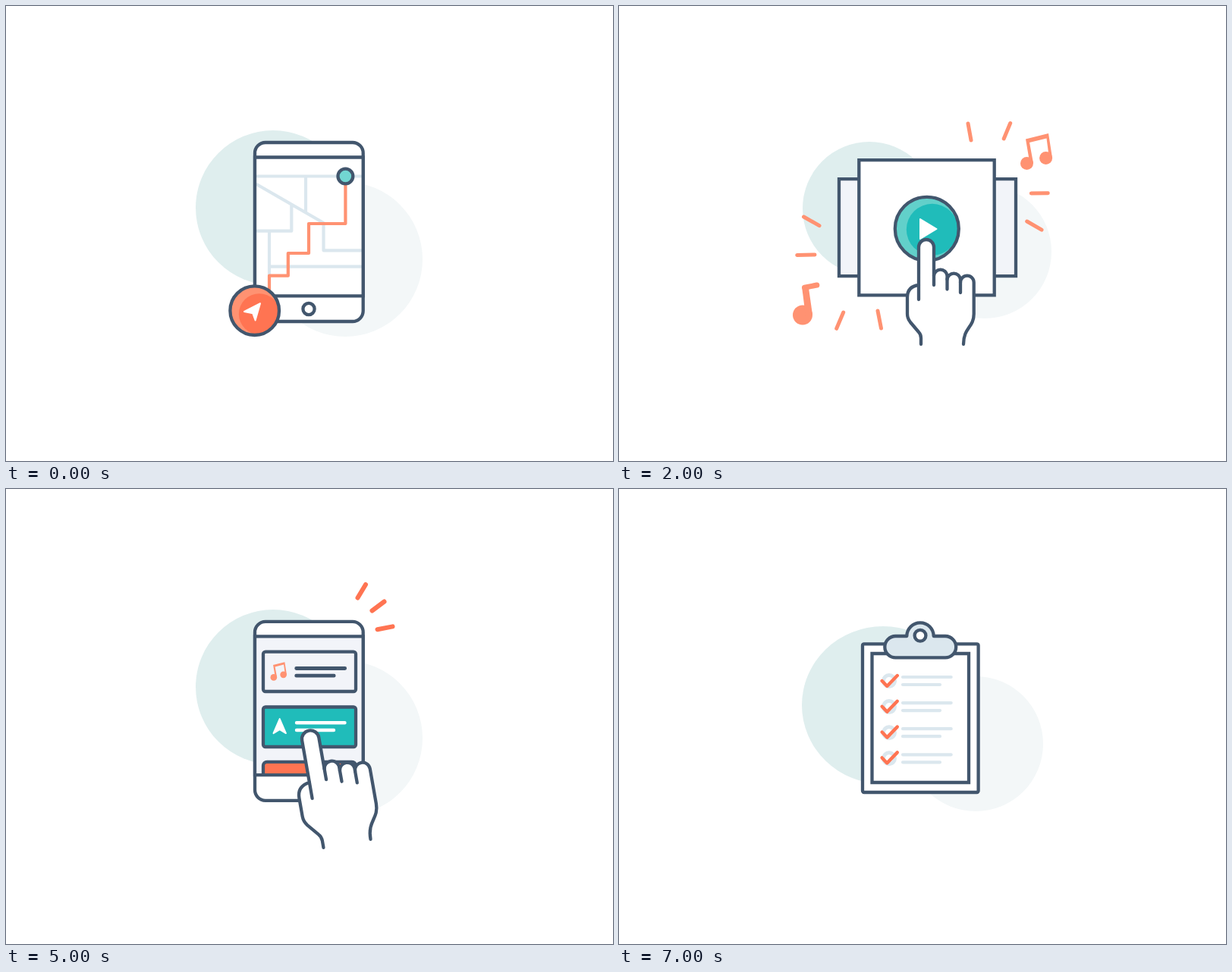
Animation, 800 px wide and 600 px high, one loop 8 s. Source, as an HTML page:

```html
<!DOCTYPE html>
<html lang="en">
<head>
<meta charset="utf-8">
<title>App features</title>
<style>
  html, body { margin: 0; width: 100%; height: 100%; overflow: hidden; background: #fff; }
  svg { display: block; width: 800px; height: 600px; }
  .scene { fill: none; stroke-linecap: round; stroke-linejoin: round; }
  .line { stroke: #42566d; stroke-width: 4.3; vector-effect: non-scaling-stroke; }
  .miter { stroke-linejoin: miter; }
</style>
</head>
<body>
<svg id="stage" viewBox="0 0 800 600"></svg>
<script>
const MINT = '#dfeeee', MIST = '#f3f7f8', PALE = '#dbe7ee', LAVENDER = '#f2f4f9', INK = '#42566d';
const TEAL = '#20bcba', AQUA = '#62d0ca', SKY = '#72d6d1', CORAL = '#ff9272', RED = '#ff7452';
const SCENE_MS = 1000;

const disc = (x, y, r, fill) => `<circle cx="${x}" cy="${y}" r="${r}" fill="${fill}"/>`;
const ring = (x, y, r, color, width) =>
  `<circle cx="${x}" cy="${y}" r="${r}" stroke="${color}" stroke-width="${width}"/>`;
const knob = (x, y, r, fill) => `<circle class="line" cx="${x}" cy="${y}" r="${r}" fill="${fill}"/>`;
const stroke = (d, color, width) => `<path d="${d}" stroke="${color}" stroke-width="${width}"/>`;
const shape = (d, fill = 'none', kind = '') => `<path class="line ${kind}" d="${d}" fill="${fill}"/>`;
const solid = (d, color = '#fff') => `<path d="${d}" fill="${color}" stroke="${color}" stroke-width="2"/>`;
const box = (x1, y1, x2, y2, fill = '#fff', r = 0) =>
  `<rect class="line ${r ? '' : 'miter'}" x="${x1}" y="${y1}" width="${x2 - x1}" height="${y2 - y1}" rx="${r}" fill="${fill}"/>`;
const group = (transform, content) => `<g transform="${transform}">${content}</g>`;
const repeat = (items, draw) => items.map(draw).join('');

// Round button whose darker face is shifted inside the rim.
function badge(x, y, r, [dx, dy, faceR], light, dark) {
  const id = `rim${x}-${y}`.replace(/\./g, '_');
  return `<clipPath id="${id}"><circle cx="${x}" cy="${y}" r="${r}"/></clipPath>` +
    disc(x, y, r, light) +
    `<g clip-path="url(#${id})">${disc(x + dx, y + dy, faceR, dark)}</g>` +
    knob(x, y, r, 'none');
}
const coralBadge = (x, y) => badge(x, y, 32.3, [6.2, 4.5, 27], CORAL, RED);
const tealBadge = (x, y) => badge(x, y, 29.2, [4.6, 0, 23.5], AQUA, TEAL);

const arrow = (x, y) => group(`translate(${x} ${y})`, solid('M0-9.5L8.2 9.5L0 4.6L-8.2 9.5Z'));
const dots = (x, y, color) => repeat([-8.5, 0, 8.5], dx => disc(x + dx, y, 3, color));
const textLines = (x, y, long, short, gap, color, width = 4.2) =>
  stroke(`M${x} ${y}h${long}M${x} ${y + gap}h${short}`, color, width);

const musicNotes = disc(537.5, 207.5, 8.5, CORAL) + disc(562.6, 200.5, 8.5, CORAL) +
  `<path fill="${CORAL}" d="M536 175.5L566 168L571 200L567 201L563.5 174.5L541 180L546 207L541.5 208Z"/>`;

const palm = 'M398 446V438Q398 433 395 430L384 417Q380 412 380 406V384Q380 370 395 368' +
  'V318a10 10 0 0 1 20 0V355.5a8.8 8.8 0 0 1 17.5 0V360.5a8.8 8.8 0 0 1 17.5 0' +
  'V364.5a8.8 8.8 0 0 1 17.7 0V406C467.7 424 454 424 454 446';
const hand = `<path d="${palm}" fill="#fff"/>` +
  shape(palm) + shape('M395 368V387M415 355V368M432.5 360V373.5M450 364V378');

function phone(y, screenFill, content) {
  return group(`translate(0 ${y})`,
    box(328, 0, 470.7, 236, '#fff', 14) +
    `<path d="M328 19.5H470.7V202.3H328Z" fill="${screenFill}"/>` + content +
    box(328, 19.5, 470.7, 202.3, 'none'));
}

const blobs = (x1, y1, r1, x2, y2, r2) => disc(x1, y1, r1, MINT) + disc(x2, y2, r2, MIST);

const navigation = blobs(352, 266, 102, 447, 334, 102) +
  phone(180, '#fff',
    stroke('M331 44.5H468M395 44.5V92M331 55.5L418.5 106V142.3H468M376.3 83V116.7H331M347 116.7V176M347 163.7H468', PALE, 4.2) +
    stroke('M347 200V175.7H371.8V146H399V107H447.4V44.5', CORAL, 4.2) +
    knob(447.4, 44.5, 9.9, SKY) + knob(399, 219.5, 7.6, '#fff')) +
  coralBadge(327.7, 401.7) +
  solid('M335 392.2L314 403L325.3 405.3L328.6 414.5Z');

const leftBubble = (y, textX) =>
  shape(`M346.5 ${y}H457.3V${y + 33.7}H354.5V${y + 11.5}Z`, '#fff', 'miter') +
  textLines(textX, y + 12, 70, 54, 11, PALE);

const chat = blobs(359.5, 271, 97.5, 433, 322, 84) +
  box(303.6, 161, 472, 421.6, '#fff', 3) +
  `<path d="M305.5 163H470V187.5H305.5Z" fill="${PALE}"/>` + shape('M303.6 187.5H472') +
  knob(327, 215, 11.4, SKY) + leftBubble(210.4, 367) +
  knob(445.7, 266.3, 11.4, RED) +
  shape('M426.3 262H315.6V295.5H418.2V273Z', '#fff', 'miter') + textLines(329, 273.3, 70, 54, 10.9, PALE) +
  knob(327, 317.8, 11.4, SKY) + leftBubble(313.5, 368.5) +
  box(317.5, 366.8, 457, 407) + stroke('M329 379.3H383', PALE, 4.2) + dots(399, 379.3, RED) +
  stroke('M496.5 362L505.3 348M512.7 377L526 367M518.5 398L535.5 394.7', CORAL, 5) +
  coralBadge(472.3, 405.7) +
  '<rect x="467" y="388.5" width="10.5" height="21.3" rx="1.5" fill="#fff"/>' +
  stroke('M461 404.5a11.3 11.3 0 0 0 22.6 0M472.3 416V422.3', '#fff', 3.8);

const player = blobs(330, 267, 88, 482, 324, 88) +
  box(290, 228.2, 523, 356.2, LAVENDER) + box(316.3, 203.2, 494.7, 381.4) +
  badge(405.8, 293.8, 42, [7, 1, 34], AQUA, TEAL) +
  solid('M397 281L418.5 294L397 307Z') + hand +
  stroke('M460 155L464 177M515.7 154.5L507.2 175M543.3 247L565.3 246.7M537.7 284L557 295.2' +
    'M243.5 278L264 289.7M234.7 328.5L258 328M295.7 404L286.7 425.3M341 402L345.5 425', CORAL, 5) +
  musicNotes + disc(242, 407.5, 13, CORAL) +
  `<path fill="${CORAL}" d="M246 409L241 370L250 372L255 407Z"/>` + stroke('M244.6 371.3L260.8 368', CORAL, 7);

// spread pushes the side badges outwards.
const devices = spread =>
  repeat([[148, 5.5], [107, 4.2], [75.2, 4.2]], ([r, w]) => ring(400, 300, r, MINT, w)) +
  box(328, 254, 472, 300, '#fff', 14) + box(328, 281, 472, 459, LAVENDER) +
  disc(400, 364, 20, CORAL) +
  tealBadge(400, 169.5) + dots(400, 169.5, '#fff') +
  group(`translate(${-spread} 0)`, tealBadge(269.5, 323.5) + arrow(269.5, 323.8)) +
  group(`translate(${spread} 0)`, tealBadge(530.5, 323.5) + solid('M525 315L539.5 323.5L525 332.3Z'));

const menu = blobs(352, 261, 102, 447, 328.5, 102) +
  phone(174.8, LAVENDER,
    box(339, 39.8, 461, 92.2, LAVENDER, 3) + box(339, 112.7, 461, 165.2, TEAL, 3) +
    shape('M339 202V190a5 5 0 0 1 5-5H456a5 5 0 0 1 5 5V202', RED) +
    textLines(382.7, 61.7, 64, 49.5, 9.7, INK, 4.8) + textLines(383, 133.5, 63.5, 49, 9.7, '#fff', 4.4)) +
  group('translate(359.2 240.5) scale(.51) translate(-550 -192)', musicNotes) + arrow(360.7, 312.6) +
  stroke('M463.5 143.5L474 126M482.5 160.5L498.5 148.5M489.5 185.3L509.5 181.4', RED, 6) +
  group('translate(403.6 408) rotate(-10) scale(1.125) translate(-395 -387)', hand);

const checklist = (checked, blobX) =>
  `<ellipse cx="${blobX}" cy="285" rx="107" ry="104" fill="${MINT}"/>` + disc(470, 336, 89, MIST) +
  box(321, 204.3, 473.6, 400, '#fff', 2) + box(333.5, 217, 461, 387) +
  shape('M364.5 194H379.3a17.7 17.7 0 0 1 35.4 0H430a14.2 14.2 0 0 1 0 28.4H364.5a14.2 14.2 0 0 1 0-28.4Z', PALE) +
  knob(397, 193.2, 7.4, '#fff') +
  repeat([0, 1, 2, 3], i => {
    const y = 34.1 * i;
    return ring(356, 253 + y, 7.5, PALE, 5) + textLines(374, 248 + y, 63.7, 49, 10, PALE) +
      (checked ? stroke(`M346.6 ${253 + 33.8 * i}l6.7 7l13.5 -14`, RED, 4.4) : '');
  });

const scenes = [
  navigation, chat, player, devices(0),
  group('translate(400 300) scale(1.077) translate(-400 -300)', devices(11)),
  menu, checklist(false, 343), checklist(true, 348)
];

const stage = document.getElementById('stage');
stage.innerHTML = repeat(scenes, content => `<g class="scene" visibility="hidden">${content}</g>`);
const layers = stage.querySelectorAll('.scene');

function render(now) {
  const current = Math.floor(now / SCENE_MS) % layers.length;
  layers.forEach((layer, i) => layer.setAttribute('visibility', i === current ? 'visible' : 'hidden'));
  requestAnimationFrame(render);
}
render(performance.now());
</script>
</body>
</html>
```
